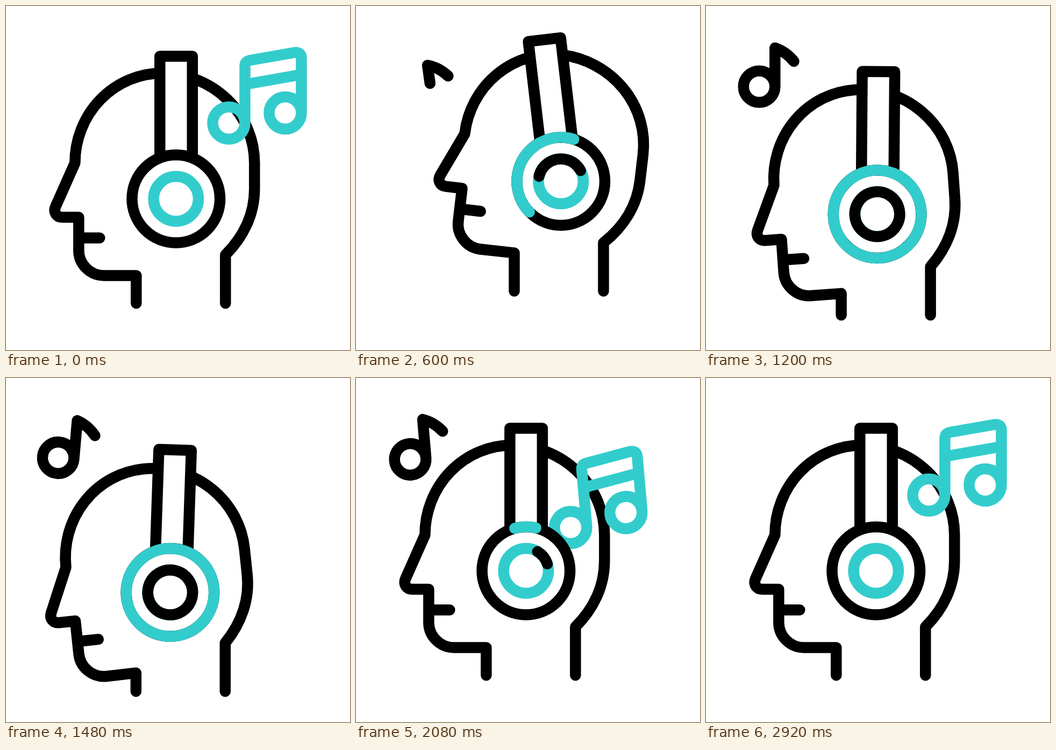
Write an HTML page with a canvas that moves like this. It is 640 px wide and 640 px high and loops after 3 s.

```html
<!DOCTYPE html>
<html lang="en">
<head>
<meta charset="utf-8">
<title>Head with headphones</title>
<style>
  html, body { margin: 0; width: 100%; height: 100%; overflow: hidden; background: #fff; }
  canvas { display: block; }
</style>
</head>
<body>
<canvas id="stage" width="640" height="640"></canvas>
<script>
const ctx = document.getElementById('stage').getContext('2d');
const LOOP = 3000, STEP = 40;
const BLACK = '#000', TEAL = '#33cccc';
const RAD = Math.PI / 180;

const clamp = p => Math.min(1, Math.max(0, p));
const smooth = p => p * p * (3 - 2 * p);
const linear = p => p;
const ramp = (t, from, to) => smooth(clamp((t - from) / (to - from)));

// Interpolates [time, value] keys, holding the first and last value.
function track(t, keys, ease = smooth) {
  if (t <= keys[0][0]) return keys[0][1];
  for (let i = 1; i < keys.length; i++) {
    const [t0, v0] = keys[i - 1], [t1, v1] = keys[i];
    if (t <= t1) return v0 + (v1 - v0) * ease((t - t0) / (t1 - t0));
  }
  return keys[keys.length - 1][1];
}

// The head nods forward-up, then back-down, then returns.
const nod = (t, up, down) =>
  track(t, [[155, 0], [755, up], [840, up], [1320, down], [1420, down], [1985, 0]]);

function layer(draw) {
  ctx.save();
  draw();
  ctx.restore();
}

function circle(x, y, r) {
  ctx.moveTo(x + r, y);
  ctx.arc(x, y, r, 0, 2 * Math.PI);
}

function drawHead(x, y, angle) {
  layer(() => {
    ctx.translate(x, y);
    ctx.beginPath();
    ctx.moveTo(0, 90);
    ctx.lineTo(0, 0);
    layer(() => {
      ctx.rotate(angle);
      ctx.translate(-408, -463);
      ctx.bezierCurveTo(441, 430, 462, 388, 462, 340);
      ctx.lineTo(462, 290);
      ctx.ellipse(290, 292, 172, 167, 0, 0, -Math.PI / 2, true);
      ctx.ellipse(290, 292, 162, 167, 0, -Math.PI / 2, -Math.PI, true);
      ctx.lineTo(92, 373);
      ctx.bezierCurveTo(87, 384, 94, 393, 104, 393);
      ctx.lineTo(135, 393);
      ctx.lineTo(135, 455);
      ctx.bezierCurveTo(135, 480, 156, 501.5, 182, 501.5);
    });
    // The neck stays upright while the head turns.
    ctx.lineTo(-166, 38.5 * Math.cos(angle) - 166 * Math.sin(angle));
    ctx.lineTo(-166, 90);
    ctx.rotate(angle);
    ctx.moveTo(-273, -31.5);
    ctx.lineTo(-234, -31.5);
    ctx.strokeStyle = BLACK;
    ctx.stroke();
  });
}

// Ring whose colour is swept over by another one, then uncovered again.
function drawRing(r, base, cover, start, grown, trimmed) {
  ctx.beginPath();
  circle(0, 0, r);
  ctx.strokeStyle = base;
  ctx.stroke();
  if (grown <= 0 || trimmed >= 1) return;
  ctx.beginPath();
  ctx.arc(0, 0, r, (start + 360 * trimmed) * RAD, (start + 360 * grown) * RAD);
  ctx.strokeStyle = cover;
  ctx.stroke();
}

function drawHeadphones(t, x, y, angle) {
  layer(() => {
    ctx.translate(x, y);
    ctx.fillStyle = '#fff';
    ctx.strokeStyle = BLACK;
    layer(() => {
      ctx.rotate(angle);
      ctx.beginPath();
      ctx.moveTo(-30, -76);
      ctx.lineTo(-30, -265.3);
      ctx.lineTo(30.5, -265.3);
      ctx.lineTo(30.5, -76);
      ctx.fill();
      ctx.stroke();
    });
    ctx.beginPath();
    circle(0, 0, 82);
    ctx.fill();
    const outer = track(t, [[314, 98], [400, 109], [880, 173], [1760, 250], [2080, 283], [2200, 295]], linear);
    const inner = track(t, [[314, 157], [400, 167], [880, 229], [1760, 308], [2080, 342], [2200, 354]], linear);
    drawRing(81.8, BLACK, TEAL, outer, ramp(t, 314, 954), ramp(t, 1521, 2195));
    drawRing(41.7, TEAL, BLACK, inner, ramp(t, 344, 950), ramp(t, 1584, 2212));
  });
}

// Double note: slips behind the ear cup, later rises out of it and sways.
function drawDoubleNote(t) {
  const leaving = t < 1200;
  const away = leaving ? ramp(t, 160, 640) : (1 - clamp((t - 1730) / 1040)) ** 3;
  const size = leaving ? 1 - ramp(t, 420, 640) : ramp(t, 1780, 2040);
  if (size <= 0) return;
  const sway = track(t, [[1800, 0], [2080, -5], [2360, 0], [2560, 3], [2840, 0]]);
  layer(() => {
    ctx.translate(467 - 151 * away ** 1.65, 167 + 192 * away);
    ctx.rotate(sway * RAD);
    ctx.scale(size, size);
    ctx.translate(-467, -167);
    ctx.beginPath();
    circle(414.5, 217.7, 30);
    ctx.lineTo(444.5, 112);
    ctx.quadraticCurveTo(444.5, 102.5, 454, 101);
    ctx.lineTo(537, 86.5);
    ctx.quadraticCurveTo(549.5, 85.5, 549.5, 97);
    ctx.lineTo(549.5, 199);
    circle(519.5, 199, 30);
    ctx.moveTo(444.5, 146);
    ctx.lineTo(549.5, 127.5);
    ctx.strokeStyle = TEAL;
    ctx.stroke();
  });
}

// Single note: drawn on from the flag, sways, and is wiped off again.
function drawSingleNote(t) {
  const length = 300;
  const shown = ramp(t, 480, 840) - ramp(t, 2100, 2480);
  if (shown <= 0) return;
  const slide = track(t, [[480, 4], [880, 1], [1120, 0]]);
  const sway = track(t, [[480, -8], [880, -7.5], [1200, 0], [1480, 5], [1760, 0], [2060, -4.8], [2480, -5]]);
  layer(() => {
    ctx.translate(116 + 3.5 * slide, 128 + 10 * slide);
    ctx.rotate(sway * RAD);
    ctx.translate(-116, -128);
    if (shown < 1) ctx.setLineDash([length * shown, length * 2]);
    ctx.beginPath();
    ctx.moveTo(163.5, 103);
    ctx.quadraticCurveTo(149, 85, 128.3, 78);
    ctx.lineTo(128.3, 150);
    ctx.arc(99, 150, 29.3, 0, 2 * Math.PI);
    ctx.strokeStyle = BLACK;
    ctx.stroke();
  });
}

function draw(t) {
  ctx.fillStyle = '#fff';
  ctx.fillRect(0, 0, 640, 640);
  ctx.lineWidth = 20.5;
  ctx.lineCap = ctx.lineJoin = 'round';

  const x = 408.3 + nod(t, 62.5, -0.5);
  const y = 463 + nod(t, -27, 31);
  const turn = nod(t, 8, -6.2) * RAD;
  const cos = Math.cos(turn), sin = Math.sin(turn);

  drawHead(x, y, turn);
  drawDoubleNote(t);
  drawHeadphones(t, x - 92 * cos + 104.3 * sin, y - 104.3 * cos - 92 * sin, nod(t, -8, 2) * RAD);
  drawSingleNote(t);
}

const begin = performance.now();
function tick() {
  const t = (performance.now() - begin) % LOOP;
  draw(Math.floor(t / STEP) * STEP);
  requestAnimationFrame(tick);
}
tick();
</script>
</body>
</html>
```
